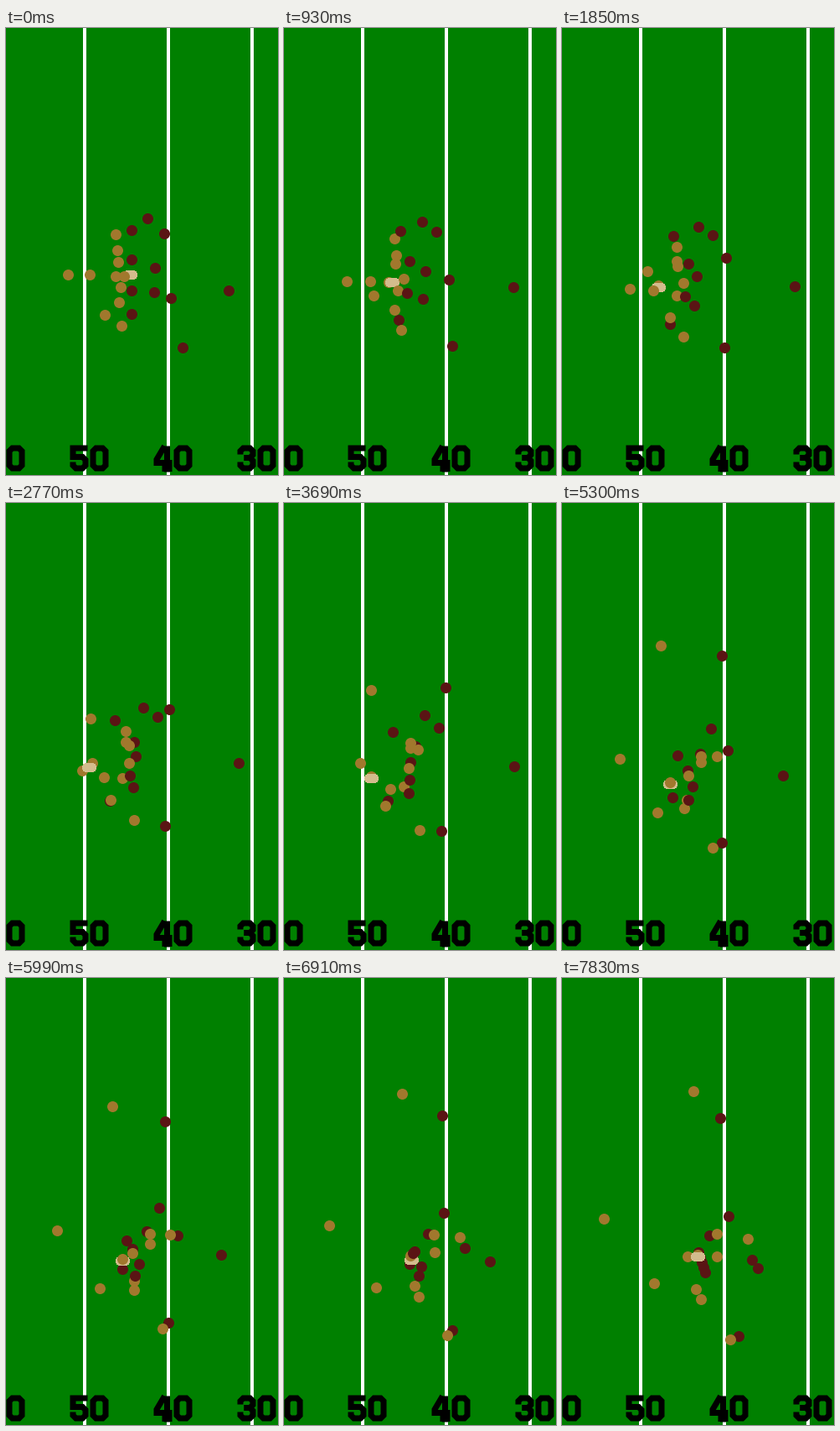
Write a matplotlib script that moves like this. It is 325x533 px and loops after 8060 ms.

```python
import numpy as np
import matplotlib.pyplot as plt
from matplotlib.animation import FuncAnimation
from matplotlib.patches import Ellipse

W, H, DPI = 325, 533, 100
PX = 72 / DPI              # one pixel in points
TICK, LOOP, STEP = 20, 8060, 230
LAST = LOOP // STEP - 1
GOLD, MAROON, TAN = "#a1782d", "#5a1414", "#d3bc8d"

steps = np.arange(LAST + 1)
u = (steps / LAST)[:, None]
EASE = 0.3 * u + 0.7 * u * u * (3 - 2 * u)
ARC = 4 * u * (1 - u)


def run(start, end, bend=(-5, 0)):
    """Eased path from start to end, bowed sideways by bend at half time."""
    a, b, c = map(np.array, (start, end, bend))
    return a + (b - a) * EASE + c * ARC


def tackle(rank, start, bend):
    """Run that ends in the pile around the ball."""
    return run(start, (163 + 2 * rank, 327 + 6 * rank), bend)


qb = run((131, 296), (50, 287), (-3, 18))
runner = run((74, 294), (162, 330), (-11, 15))

line = [
    run((131, 246), (185, 332)),
    run((133, 265), (185, 305), (-6, 9)),
    run((134, 279), (222, 311), (-15, 0)),
    run((141, 296), (150, 332), (4, 3)),
    run((137, 309), (160, 371)),
    run((135, 327), (110, 364), (-3, 17)),
]
fullback = run((100, 294), (166, 383), (-3, 6))
receivers = [run((118, 342), (157, 135), (-32, -24)), run((138, 355), (201, 431))]

corners = [run((197, 322), (189, 167), (0, -31)), run((211, 381), (211, 427), (-23, -11))]
safety = run((266, 313), (234, 346), (24, -14))
middle = [
    run((169, 227), (199, 284), (-15, 0)),
    run((189, 245), (227, 336), (-22, -19)),
    run((150, 276), (176, 307)),
    tackle(0, (178, 286), (-20, 4)),
    tackle(1, (150, 341), (-33, 18)),
]
pile = [
    tackle(2, (150, 241), (-28, -13)),
    tackle(3, (150, 313), (-9, 2)),
    tackle(4, (177, 315), (-25, 14)),
]

# The ball goes from the snap to the quarterback, then to the runner
snap = np.interp(steps, [0, 5], [0, 1])[:, None]
handoff = np.interp(steps, [10, 16], [0, 1])[:, None]
held = qb + (runner - qb) * handoff + (0, 2)
ball_track = np.array((148, 294)) * (1 - snap) + held * snap

fig = plt.figure(figsize=(W / DPI, H / DPI), dpi=DPI, facecolor="#008000")
ax = fig.add_axes([0, 0, 1, 1])
ax.set(xlim=(0, W), ylim=(H, 0))
ax.axis("off")

for x in (92, 192, 292):
    ax.axvspan(x, x + 4, color="white", lw=0, zorder=1)

# Block numerals as thick strokes in a 22 x 31 cell, on these guide lines
L, R, T, B, M, CUT = 3.5, 18.5, 3.5, 27.5, 15, 3.5
BOWL = [(R, B - CUT), (R - CUT, B), (L + CUT, B), (L, B - CUT)]
GLYPHS = {
    "0": [[(11, T), (R - CUT, T), (R, T + CUT), *BOWL, (L, T + CUT), (L + CUT, T), (11, T)]],
    "3": [[(L, 11), (L, T + CUT), (L + CUT, T), (R - CUT, T), (R, T + CUT),
           (R, M - CUT), (R - CUT, M), (8, M)],
          [(8, M), (R - CUT, M), (R, M + CUT), *BOWL, (L, 20)]],
    "4": [[(M, 0), (M, 31)], [(13, 1), (L, 17), (L, 21), (22, 21)], [(9, B), (21, B)]],
    "5": [[(21, T), (L, T), (L, 14), (R - CUT, 14), (R, 14 + CUT), *BOWL, (L, 20)]],
}


def numeral(char, x, y=497.5):
    for stroke in GLYPHS[char]:
        xs, ys = np.array(stroke).T
        ax.plot(xs + x, ys + y, color="black", lw=7 * PX, zorder=1,
                solid_capstyle="butt", solid_joinstyle="miter")


for label, mid in (("0", 0), ("50", 100), ("40", 200), ("30", 300)):
    numeral(label[-1], mid + 0.5)
    if len(label) > 1:
        numeral(label[0], mid - 23.5)


def squad(paths, color, z):
    tracks = np.round(paths)
    dots = ax.scatter(*tracks[:, 0].T, s=(13 * PX) ** 2, c=color, linewidths=0,
                      antialiased=False, zorder=z)
    return dots, tracks


squads = [squad([*middle, *corners, safety], MAROON, 2), squad([qb, runner], GOLD, 3),
          squad([*line, fullback, *receivers], GOLD, 5), squad(pile, MAROON, 6)]
ball_track = np.round(ball_track) + 0.5
ball = ax.add_patch(Ellipse(ball_track[0], 17, 11, fc=TAN, lw=0, antialiased=False))


def ball_layer(step):
    if 19 <= step <= 26:   # tucked under the runner
        return 2.5
    return 7 if step >= 32 else 4


def update(n):
    step = min(n * TICK // STEP, LAST)
    for dots, tracks in squads:
        dots.set_offsets(tracks[:, step])
    ball.set_center(ball_track[step])
    ball.set_zorder(ball_layer(step))


anim = FuncAnimation(fig, update, frames=LOOP // TICK, interval=TICK, repeat=True,
                     repeat_delay=0, cache_frame_data=False)
plt.show()
```
